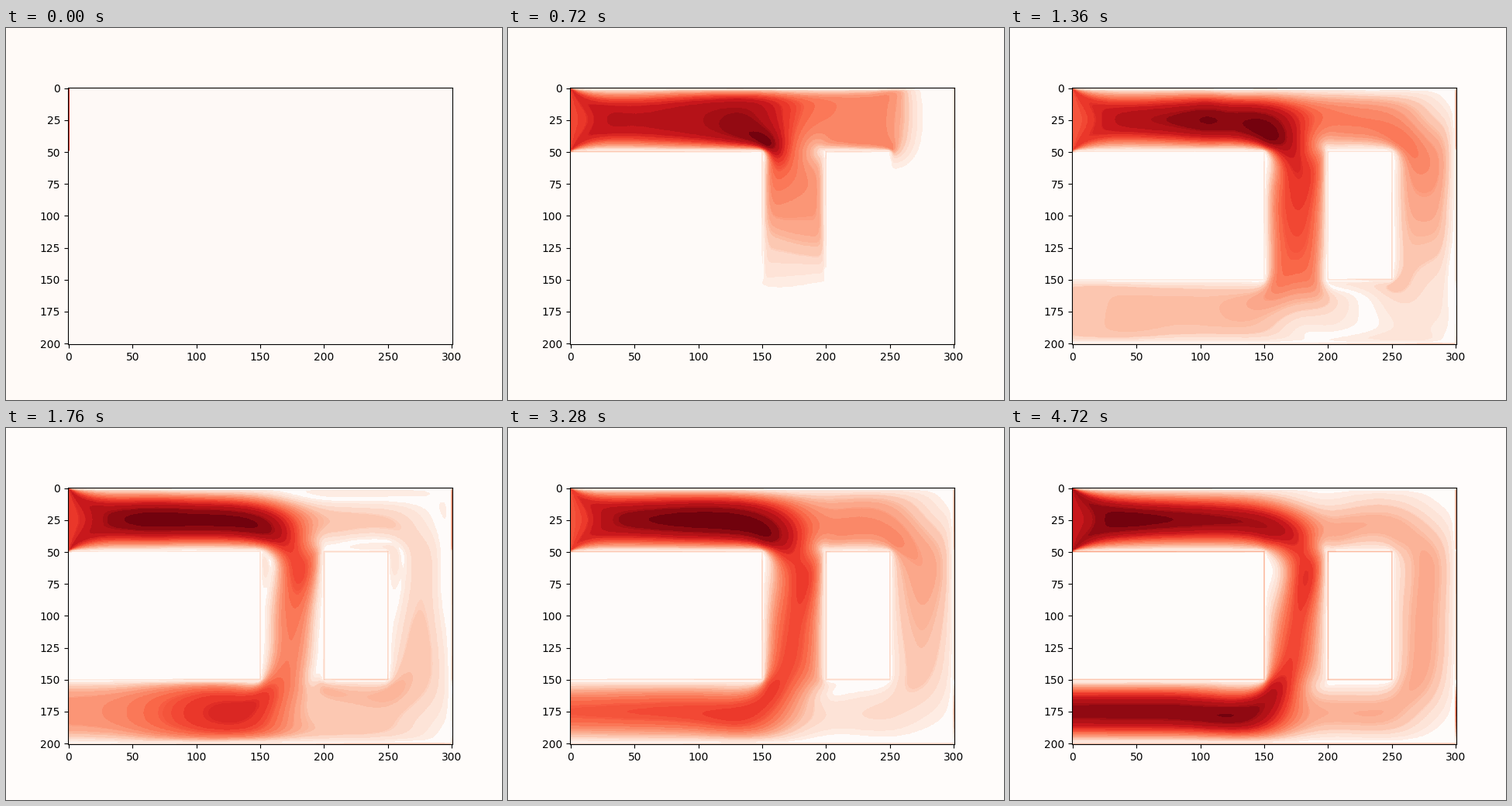
Write a matplotlib script that moves like this. It is 640 px wide and 480 px high and loops after 4800 ms.

```python
import numpy as np
import matplotlib.pyplot as plt
from matplotlib.animation import FuncAnimation
from matplotlib.colors import ListedColormap

# Lattice Boltzmann (D2Q9) flow through a small network of channels
NX, NY = 301, 201
FRAMES, STEPS = 60, 50
U_IN = 0.04
NU = 0.1
OMEGA = 1 / (3 * NU + 0.5)

DIRS = [(0, 0), (1, 0), (-1, 0), (0, 1), (0, -1),
        (1, 1), (-1, -1), (1, -1), (-1, 1)]
OPP = [0, 2, 1, 4, 3, 6, 5, 8, 7]
RIGHT, LEFT, MID = [1, 5, 7], [2, 6, 8], [0, 3, 4]
W = np.array([4 / 9] + [1 / 9] * 4 + [1 / 36] * 4, dtype=np.float32)[:, None]
CX = np.array([d[0] for d in DIRS], dtype=np.float32)[:, None]
INFLOW_EQ = W * (1 + 3 * CX * U_IN + 4.5 * (CX * U_IN) ** 2 - 1.5 * U_IN ** 2)

INLET = slice(0, 50)
OUTLET = slice(151, 200)
BLOCKS = [(slice(0, 51), slice(0, NX)),
          (slice(51, 150), slice(150, NX)),
          (slice(150, NY), slice(0, NX))]


def wall_nodes():
    wall = np.zeros((NY, NX), bool)
    wall[[0, -1]] = True
    wall[:, -1] = True
    for x0, x1 in [(0, 150), (200, 250)]:
        wall[[50, 150], x0:x1 + 1] = True
        wall[50:151, x0] = True
        wall[50:151, x1] = True
    return np.flatnonzero(wall)


def moments(f):
    rho = f.sum(axis=0)
    a = f[5] - f[6]
    b = f[7] - f[8]
    ux = (f[1] - f[2] + a + b) / rho
    uy = (f[3] - f[4] + a - b) / rho
    return rho, ux, uy


def collide(f):
    rho, ux, uy = moments(f)
    base = 1 - 1.5 * (ux * ux + uy * uy)
    ux *= 3
    uy *= 3
    axial = rho * (OMEGA / 9)
    diagonal = axial * 0.25
    f *= 1 - OMEGA
    f[0] += 4 * axial * base
    pairs = [(1, ux, axial), (3, uy, axial),
             (5, ux + uy, diagonal), (7, ux - uy, diagonal)]
    for i, cu, weight in pairs:
        even = cu * cu
        even *= 0.5
        even += base
        even *= weight
        odd = cu * weight
        f[i] += even
        f[i] += odd
        f[i + 1] += even
        f[i + 1] -= odd


def simulate():
    f = np.empty((9, NY, NX), dtype=np.float32)
    f[:] = W[:, :, None]
    flat = f.reshape(9, -1)
    walls = wall_nodes()
    inlet = f[:, INLET, 0]
    outlet = f[:, OUTLET]
    speeds = []
    for step in range((FRAMES - 1) * STEPS + 1):
        outlet[RIGHT, :, 0] = outlet[RIGHT, :, 1]
        rho = (inlet[MID].sum(axis=0) + 2 * inlet[LEFT].sum(axis=0)) / (1 - U_IN)
        inlet[RIGHT] = inlet[LEFT] + 6 * U_IN * W[RIGHT] * rho

        if step % STEPS == 0:
            _, ux, uy = moments(f)
            speed = np.hypot(ux, uy)
            speed[INLET, 0] = U_IN
            speeds.append(speed / speed.max())

        bounced = flat[:, walls][OPP]
        inflow = inlet + OMEGA * (INFLOW_EQ * rho - inlet)
        for rows, cols in BLOCKS:
            collide(f[:, rows, cols])
        inlet[:] = inflow
        flat[:, walls] = bounced
        for i, (cx, cy) in enumerate(DIRS[1:], 1):
            f[i] = np.roll(f[i], (cy, cx), axis=(0, 1))
    return speeds


# Colour bands: shades sharing a coarse RGB cell become their average
REDS = plt.get_cmap("Reds")(np.arange(256), bytes=True)[:, :3].astype(int)
CELL = (REDS[:, 0] >> 5) * 128 + (REDS[:, 1] >> 4) * 8 + (REDS[:, 2] >> 5)
BAND = np.unique(CELL, return_inverse=True)[1]
MARGIN = 52700  # white area around the axes, in lattice cells


def banded_colors(speed):
    index = np.minimum((speed * 256).astype(int), 255)
    count = np.bincount(index.ravel(), minlength=256) + 1e-3
    total = np.bincount(BAND, count)
    sums = np.stack([np.bincount(BAND, count * REDS[:, c]) for c in range(3)], axis=1)
    total[BAND[0]] += MARGIN
    sums[BAND[0]] += 255 * MARGIN
    return (sums / total[:, None] / 255)[BAND]


speeds = simulate()

fig, ax = plt.subplots(figsize=(6.4, 4.8), dpi=100)
image = ax.imshow(speeds[0], vmin=0, vmax=1, interpolation="hanning")


def draw(k):
    colors = banded_colors(speeds[k])
    image.set_data(speeds[k])
    image.set_cmap(ListedColormap(colors))
    fig.set_facecolor(colors[0])
    ax.set_facecolor(colors[0])
    return [image]


anim = FuncAnimation(fig, draw, frames=FRAMES, interval=80, repeat=True, blit=False)
plt.show()
```
